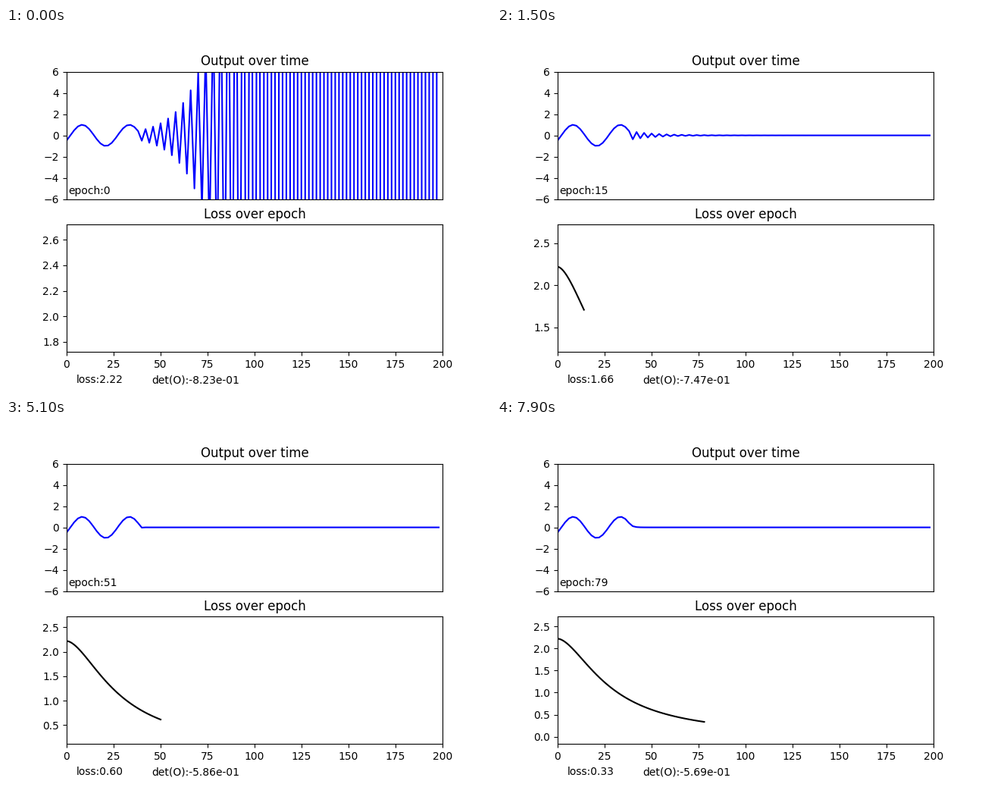
A matplotlib script that plays this animation: 640 by 480 pixels, repeating every 8 s.

```python
import numpy as np
import matplotlib.pyplot as plt
from matplotlib.animation import FuncAnimation

EPOCHS = 80
DRIVEN, STEPS = 20, 100

epochs = np.arange(EPOCHS)
time = 2 * np.arange(STEPS)

# Training: the loss decays, and the recurrent weight follows its square root
decay = 1 / (1 + (epochs / 28.443) ** 1.706)
loss = 2.22 * decay
weight = -1.178 + 2.34 * (1 - np.sqrt(decay))
det = -0.568 - 0.255 * np.exp(-(epochs / 28.13) ** 1.65)

# A driven sine, then the network feeds on its own output
drive = np.sin(0.5 * np.arange(DRIVEN) - 0.5)


def output(w):
    free = 1.04 * drive[-1] * w ** np.arange(1, STEPS - DRIVEN + 1)
    return np.concatenate([drive, free])


fig, (top, bottom) = plt.subplots(2, 1, figsize=(6.4, 4.8), dpi=100)

top.set_title("Output over time")
top.set(xlim=(0, 200), ylim=(-6, 6), xticks=[], yticks=range(-6, 7, 2))
signal, = top.plot([], [], "b", lw=1.5)
epoch_text = top.text(1, -5.5, "")

bottom.set_title("Loss over epoch")
bottom.set_xlim(0, 200)
history, = bottom.plot([], [], "k", lw=1.5)
loss_text = fig.text(0.145, 0.025, "")
det_text = fig.text(0.3, 0.025, "")


def update(n):
    signal.set_data(time, output(weight[n]))
    history.set_data(epochs[:n], loss[:n])
    bottom.set_ylim(loss[max(n - 1, 0)] - 0.5, loss[0] + 0.5)
    epoch_text.set_text(f"epoch:{n}")
    loss_text.set_text(f"loss:{loss[n]:.2f}")
    det_text.set_text(f"det(O):{det[n]:.2e}")
    return signal, history, epoch_text, loss_text, det_text


anim = FuncAnimation(fig, update, frames=EPOCHS, interval=100,
                     repeat=True, repeat_delay=0)
plt.show()
```
